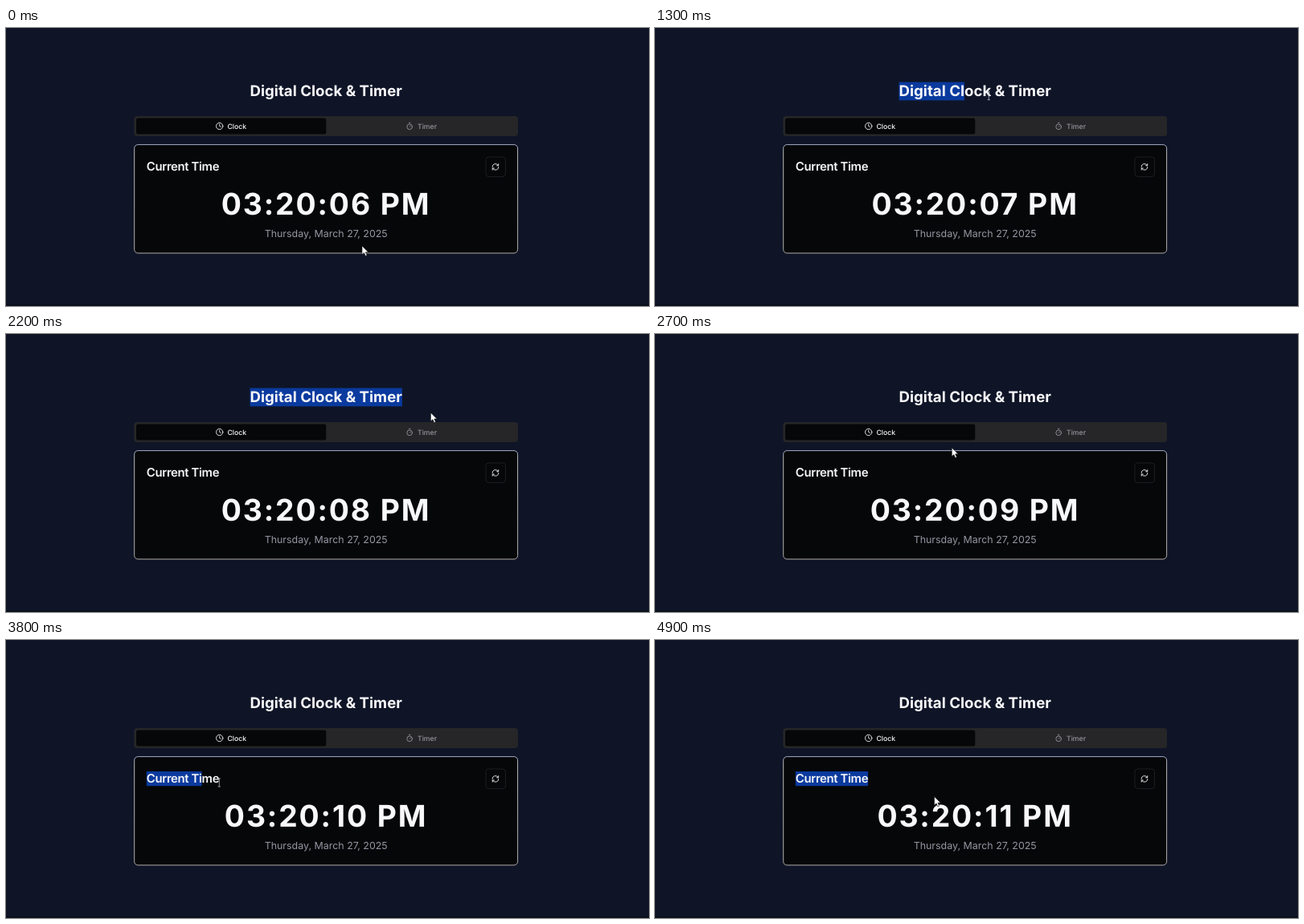
An HTML page for the animation above (5 s loop, 800 px wide and 347 px high).

```html
<!DOCTYPE html>
<html lang="en">
<head>
<meta charset="utf-8">
<title>Digital Clock &amp; Timer</title>
<style>
  html, body { margin: 0; width: 100%; height: 100%; overflow: hidden; background: #0f1527; }
  svg { display: block; width: 800px; height: 347px; }
  text {
    font-family: Inter, sans-serif; font-optical-sizing: none;
    text-rendering: geometricPrecision; fill: #f8f8fa; white-space: pre;
  }
  .mid { text-anchor: middle; }
  #title { font-size: 18.67px; font-weight: 700; }
  #heading { font-size: 14.93px; font-weight: 600; letter-spacing: -.025em; }
  #time { font-size: 37.33px; font-weight: 700; letter-spacing: .05em; }
  #date { font-size: 12.44px; fill: #9496a2; }
  .tab { font-size: 8.71px; font-weight: 500; }
  .icon { fill: none; stroke: #f0f0f2; stroke-width: 2.2; stroke-linecap: round; stroke-linejoin: round; }
  .off { fill: #94949c; }
  .icon.off { fill: none; stroke: #94949c; }
  .sel { fill: #0a3a9e; }
</style>
</head>
<body>
<svg viewBox="0 0 800 347">
  <defs>
    <linearGradient id="edge" x2="0" y2="1">
      <stop stop-color="#a3abc8"/>
      <stop offset=".08" stop-color="#bdbab6"/>
      <stop offset="1" stop-color="#b0aca8"/>
    </linearGradient>
  </defs>
  <rect width="800" height="347" fill="#0f1527"/>
  <rect y="345" width="800" height="2" fill="#0b101e"/>

  <rect class="sel" id="titleSel" y="67.5" height="22.8"/>
  <text id="title" class="mid" x="398.2" y="85.2">Digital Clock &amp; Timer</text>

  <rect x="159.3" y="110" width="477.7" height="25" rx="4" fill="#262628"/>
  <rect x="162" y="112.5" width="236.3" height="20" rx="2.5" fill="#060709"/>
  <g class="icon" transform="translate(260.7 117.5) scale(.415)">
    <circle cx="12" cy="12" r="10"/><path d="M12 6v6l4 2"/>
  </g>
  <text class="tab" x="275.4" y="125.5">Clock</text>
  <g class="icon off" transform="translate(497.2 117.5) scale(.415)">
    <circle cx="12" cy="14" r="8"/><path d="M10 2h4M12 14l3-3"/>
  </g>
  <text class="tab off" x="512" y="125.5">Timer</text>

  <rect x="159.7" y="145.6" width="476.9" height="135.4" rx="4.5" fill="#060709" stroke="url(#edge)"/>
  <rect class="sel" id="headingSel" y="164" height="18.2"/>
  <text id="heading" x="174.8" y="178.2">Current Time</text>
  <rect x="597" y="161" width="24.5" height="24.5" rx="3.5" fill="none" stroke="#242428" stroke-width=".8"/>
  <g class="icon" transform="translate(604 168.4) scale(.415)">
    <path d="M3 12a9 9 0 0 1 9-9 9.75 9.75 0 0 1 6.74 2.74L21 8M21 3v5h-5"/>
    <path d="M21 12a9 9 0 0 1-9 9 9.75 9.75 0 0 1-6.74-2.74L3 16M8 16H3v5"/>
  </g>
  <text id="time" class="mid" x="398.1" y="232.8"></text>
  <text id="date" class="mid" x="398.2" y="261.2">Thursday, March 27, 2025</text>

  <path id="arrow" d="M0 0V10.8L2.5 8.5 4.3 12.5 6.1 11.7 4.4 7.8H7.8Z" fill="#fff" stroke="#111" stroke-width=".6"/>
  <path id="beam" d="M-1.7-5H1.7M0-5V5M-1.7 5H1.7" fill="none" stroke="#b8b8bc" stroke-width=".8"/>
</svg>
<script>
const $ = id => document.getElementById(id);
const LOOP = 5000, STEP = 100, LAG = 70;

// Pointer stops: ms, x, y
const stops = [
  [0, 443, 272], [700, 255.3, 81], [900, 255.3, 81], [1500, 495.3, 86.5], [1800, 495.3, 86.5],
  [2400, 545, 104], [2700, 369.3, 142], [3500, 172.5, 172], [3800, 265.3, 178], [LOOP, 355, 197]
];

function pointer(t) {
  const i = stops.findIndex(s => s[0] > t);
  const [t0, x0, y0] = stops[i - 1], [t1, x1, y1] = stops[i];
  const k = (t - t0) / (t1 - t0);
  return [x0 + (x1 - x0) * k, y0 + (y1 - y0) * k];
}

// Highlights every letter whose middle lies left of x
function select(id, x) {
  const text = $(id);
  const start = text.getStartPositionOfChar(0).x;
  let end = start;
  for (let i = 0; i < text.getNumberOfChars(); i++) {
    const left = text.getStartPositionOfChar(i).x, right = text.getEndPositionOfChar(i).x;
    if ((left + right) / 2 < x) end = right;
  }
  $(id + "Sel").setAttribute("x", start);
  $(id + "Sel").setAttribute("width", end - start);
}

function draw(t) {
  const second = 6 + Math.floor((t + 400) / 1000);
  $("time").textContent = `03:20:${String(second).padStart(2, "0")} PM`;

  // The highlight trails the pointer slightly
  const dragX = pointer(Math.max(0, t - LAG))[0];
  select("title", t >= 1100 && t < 2500 ? dragX : 0);
  select("heading", t >= 3600 ? dragX : 0);

  const overText = t >= 1000 && t < 1600 || t >= 3600 && t < 4000;
  for (const [id, on] of [["arrow", !overText], ["beam", overText]]) {
    $(id).setAttribute("transform", `translate(${pointer(t)})`);
    $(id).setAttribute("visibility", on ? "visible" : "hidden");
  }
}

const begin = performance.now();
function tick() {
  const t = (performance.now() - begin) % LOOP;
  draw(Math.floor(t / STEP) * STEP);
  requestAnimationFrame(tick);
}
tick();
</script>
</body>
</html>
```
